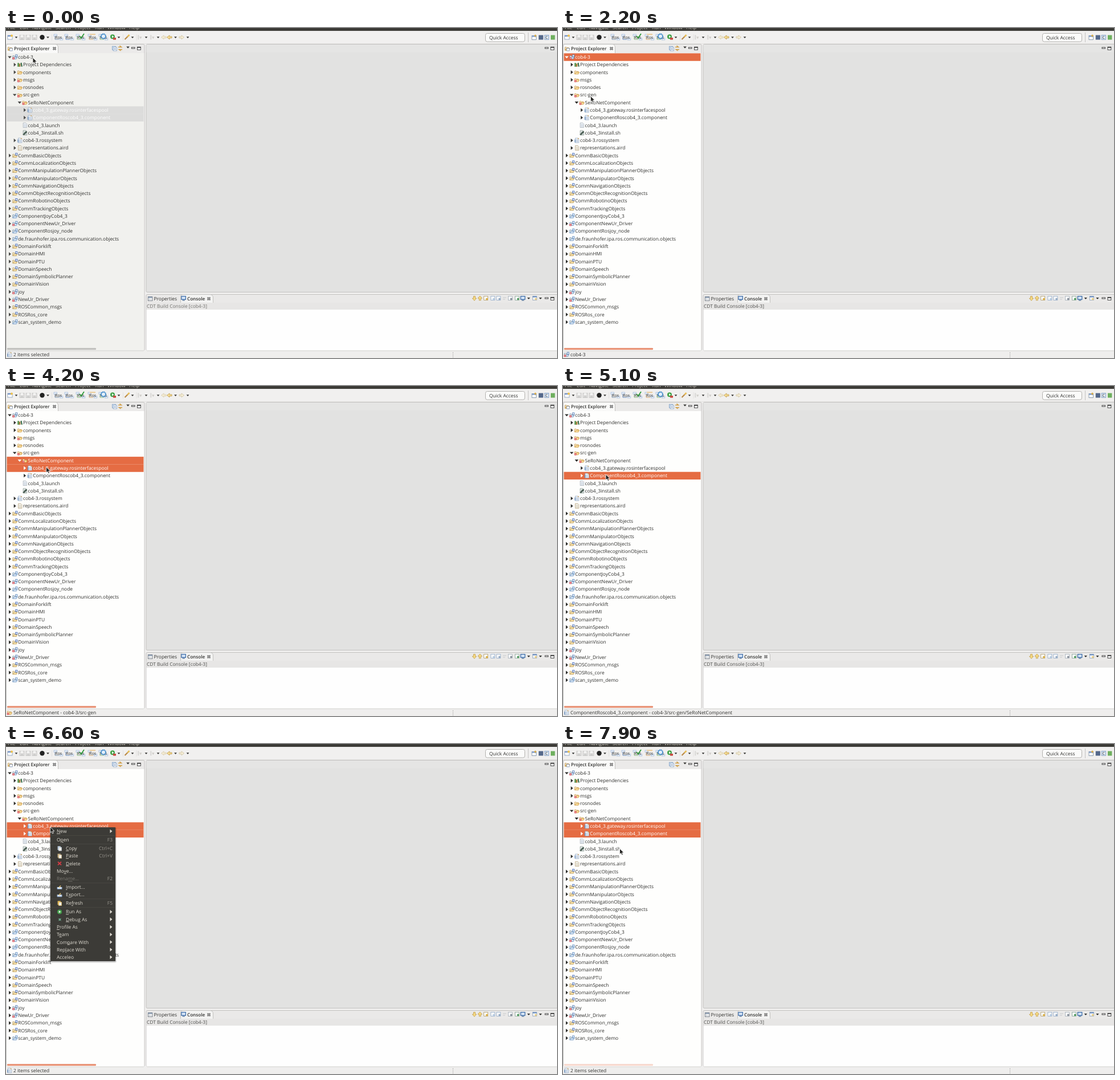
These frames come from a looping animation (967 px wide and 579 px high, 8000 ms). An HTML page:

```html
<!DOCTYPE html>
<html lang="en">
<head>
<meta charset="utf-8">
<title>Project Explorer</title>
<style>
html, body { margin: 0; width: 100%; height: 100%; overflow: hidden; background: #f0efee; }
svg { display: block; width: 967px; height: 579px; color: #30302e; }
text { font: 8.42px "Open Sans", "Noto Sans", sans-serif; fill: currentColor; text-rendering: geometricPrecision; white-space: pre; }
.bold { font-size: 8.15px; font-weight: 600; }
.row .bg { fill: none; }
.row.sel { color: #fff; }
.row.sel .bg { fill: #e56c43; }
.idle .row.sel .bg { fill: #dcdcdb; }
.idle .row .arrow { color: #4a4a48; }
#tree { fill: #fefefd; }
.idle #tree { fill: #f1f1ee; }
#label { color: #50504e; }
.idle #label { color: #72726f; }
#menu { color: #dfdbd2; }
.item .bg { fill: none; }
.item.hot { color: #fff; }
.item.hot .bg { fill: #e56c43; }
.item.hot .key { fill: #b9593a; }
.key { fill: #96938c; }
.off { color: #7b7973; }
.mn { text-decoration: underline; }
</style>
</head>
<body>
<svg id="stage" viewBox="0 0 967 579"></svg>
<script>
const LOOP = 8000, STEP = 100, ROW = 13.285, TOP = 44.4, BORDER = '#c3c2c0';

const rect = (x, y, w, h, fill, more = '') => `<rect x="${x}" y="${y}" width="${w}" height="${h}" fill="${fill}" ${more}/>`;
const path = (d, fill, more = '') => `<path d="${d}" fill="${fill}" ${more}/>`;
const line = (d, color, w = 1) => path(d, 'none', `stroke="${color}" stroke-width="${w}"`);
const dot = (x, y, r, fill) => `<circle cx="${x}" cy="${y}" r="${r}" fill="${fill}"/>`;
const text = (x, y, s, more = '') => `<text x="${x}" y="${y}" ${more}>${s}</text>`;
const at = (x, y, s) => `<g transform="translate(${x} ${y})">${s}</g>`;
const right = (x, y) => path(`M${x} ${y - 3.3}l4 3.3l-4 3.3z`, 'currentColor');
const down = (x, y, r = 2.6) => path(`M${x - r} ${y - r / 2}h${2 * r}l${-r} ${r * 1.15}z`, 'currentColor');
const minimize = (x, y) => rect(x - 2.5, y, 5.5, 2, '#fff', 'stroke="#333" stroke-width=".9"');
const maximize = (x, y) => rect(x - 2.8, y - 2.3, 5.8, 5, '#fff', 'stroke="#333" stroke-width=".9"') + rect(x - 2.8, y - 2.3, 5.8, 1.4, '#333');
const cross = (x, y) => line(`M${x - 2.3} ${y - 2.3}l4.6 4.6m0 -4.6l-4.6 4.6`, '#4a4a4a', 2.1) + line(`M${x - 1.9} ${y - 1.9}l3.8 3.8m0 -3.8l-3.8 3.8`, '#f4f4f4', .7);

// icons, centred on 0,0
const folder = (body, edge) => path('M-3.9 3.2V-2.2h2.4l.8 .9H2.6V.2', '#fdf6e0', `stroke="${edge}" stroke-width=".8"`)
  + path('M-3.9 3.2L-2 0H4.2L2.5 3.2z', body, `stroke="${edge}" stroke-width=".8"`);
const badge = rect(-4.5, .4, 3.6, 3.6, '#d8434a') + line('M-3.6 1.3l1.8 1.8m0 -1.8l-1.8 1.8', '#fff', .7);
const page = (edge, ink) => path('M-3 -4H1.6L3.4 -2.2V4H-3z', '#f6f8fb', `stroke="${edge}" stroke-width=".7"`)
  + line('M-1.7 -1.3H2M-1.7 .5H2M-1.7 2.3H2', ink, .7);
const project = (body, edge, tag) => folder(body, edge) + rect(.9, -4, 3.1, 3.4, '#fff', `stroke="${tag}" stroke-width="1"`);
const model = page('#8ba3bf', '#86a1c0') + rect(-4, -1.6, 1.6, 5.2, '#6c91bd') + rect(1.4, -4.2, 1.8, 1.8, '#d1aa6c');
const icons = {
  e: project('#cfdff1', '#6788ad', '#5c83b8') + badge,
  d: rect(-4.2, -3, 2.5, 6.6, '#4f8c42') + rect(-1.5, -1.8, 2.4, 5.4, '#ab7b3a') + path('M1 -3.2l2 -.4l1.4 7h-2.2z', '#3b6e4b'),
  f: folder('#fbe0a0', '#c8933c'),
  F: folder('#fbe0a0', '#c8933c') + badge,
  m: model,
  t: page('#9aa4af', '#a3b2c3'),
  s: page('#6d8076', '#70877b') + path('M-4 3L2 -3.4L4 -1.4L-1.4 4z', '#4a5d53'),
  a: page('#b09764', '#c4b183'),
  y: project('#fbe3ab', '#b3934f', '#4a70bd'),
  b: project('#dceaf8', '#5d87b8', '#6490c4'),
  r: project('#dceaf8', '#5d87b8', '#6490c4') + badge
};

// depth, state (v open, > closed, - leaf), icon, label
const rows = `0ve cob4-3
1>d Project Dependencies
1>f components
1>F msgs
1>f rosnodes
1vF src-gen
2vF SeRoNetComponent
3>m cob4_3.gateway.rosinterfacespool
3>m ComponentRoscob4_3.component
2-t cob4_3.launch
2-s cob4_3install.sh
1>m cob4-3.rossystem
1>a representations.aird
0>y CommBasicObjects
0>y CommLocalizationObjects
0>y CommManipulationPlannerObjects
0>y CommManipulatorObjects
0>y CommNavigationObjects
0>y CommObjectRecognitionObjects
0>y CommRobotinoObjects
0>y CommTrackingObjects
0>b ComponentJoyCob4_3
0>r ComponentNewUr_Driver
0>b ComponentRosjoy_node
0>b de.fraunhofer.ipa.ros.communication.objects
0>y DomainForklift
0>y DomainHMI
0>y DomainPTU
0>y DomainSpeech
0>y DomainSymbolicPlanner
0>y DomainVision
0>e joy
0>e NewUr_Driver
0>y ROSCommon_msgs
0>y ROSRos_core
0>b scan_system_demo`.split('\n');

function treeRow(s, i) {
  const dx = 8.7 * s[0], y = TOP + ROW * (i + .5), state = s[1];
  const arrow = state === 'v' ? down(6.5 + dx, y, 3.3) : state === '>' ? right(5 + dx, y) : '';
  return `<g class="row"><rect class="bg" x="1.5" y="${TOP + ROW * i}" width="240" height="${ROW + .1}"/>`
    + `<g class="arrow">${arrow}</g>` + at(15.8 + dx, y, icons[s[2]]) + text(21.2 + dx, y + 2.9, s.slice(4)) + '</g>';
}

// centre, label (_ marks the mnemonic), key or > for a submenu, icon colour
const items = [
  [153, '_New', '>'], [168, 'O_pen', 'F3'], [183, '_Copy', 'Ctrl+C', '#b9c7d8'], [196.4, '_Paste', 'Ctrl+V', '#c9b183'],
  [209.6, '_Delete', '', '#d23b45'], [223, 'Mo_ve...', ''], [236.4, 'Rena_me...', 'F2'], [251, '_Import...', '', '#7d9dc5'],
  [264.4, 'E_xport...', '', '#7d9dc5'], [279.2, 'Re_fresh', 'F5', '#e0b856'], [294.4, '_Run As', '>', '#44a04b'],
  [307.6, '_Debug As', '>', '#6fa58a'], [321, '_Profile As', '>'], [334.2, 'T_eam', '>'], [347.5, 'Com_pare With', '>'],
  [360.8, 'Rep_lace With', '>'], [374, 'Acceleo', '>']
];

function itemIcon(label, c) {
  if (label === '_Delete') return line('M-3 -2.8l6 5.6m0 -5.6l-6 5.6', c, 1.9);
  if (label === '_Run As') return dot(0, 0, 4, c) + path('M-1.2 -2.2l3.4 2.2l-3.4 2.2z', '#fff');
  if (label === '_Debug As') return dot(.4, .3, 2, c) + line('M-2 -2l5 5m0 -5l-5 5', c, .7);
  if (/port/.test(label)) return path('M-4 0V3.5H4V0', '#dce5ef', `stroke="${c}"`) + line('M-1 .8L2 -2.6', '#dfc173', 1.5);
  return rect(-3.4, -3.8, 5.2, 6.8, c) + rect(-1.4, -1.8, 5, 6, '#f1efe8', `stroke="${c}" stroke-width=".7"`);
}

function menuItem([y, label, key, icon]) {
  const name = label.replace(/_(.)/, '<tspan class="mn">$1</tspan>');
  return `<g class="item${key === 'F2' ? ' off' : ''}"><rect class="bg" x="79" y="${y - 6.6}" width="112" height="13.2"/>`
    + (icon ? at(94, y, itemIcon(label, icon)) : '')
    + text(icon ? 105 : 89, y + 3, name)
    + (key === '>' ? right(182.5, y) : text(187, y + 3, key, 'class="key" text-anchor="end"')) + '</g>';
}

const menuBar = () => rect(0, 0, 967, 5.2, '#3c3b37') + `<g color="#cfcbc2">`
  + [['File', 3], ['Edit', 24], ['Navigate', 46], ['Search', 87], ['Project', 121], ['Run', 156], ['Window', 178], ['Help', 216]]
    .map(([s, x]) => text(x, 2.3, s)).join('') + '</g>';

function toolbar() {
  const disk = x => at(x, 16.5, rect(-4, -4, 8, 8, '#e3e2e1', 'stroke="#c3c2c1" stroke-width=".8"') + rect(-2, -4, 4, 3, '#f7f7f6') + rect(-2.3, .8, 4.6, 3.2, '#cecdcc'));
  const ros = (x, c) => at(x, 16, rect(-8, -5, 5.4, 3.4, '#e6eef9', 'stroke="#8fadd4" stroke-width=".6"') + rect(2.4, 1.8, 5.4, 3.2, '#e6eef9', 'stroke="#8fadd4" stroke-width=".6"')
    + line('M-6 -1V4H1', c, .7) + text(-6, 3, 'Ros', 'style="font-size:7.2px" fill="#35506f"'));
  const arrow = (x, dir, fill, edge) => at(x, 16.3, path(`M${-4 * dir} -1.3H0V-3.4L${4.5 * dir} 0L0 3.4V1.3H${-4 * dir}z`, fill, `stroke="${edge}" stroke-width=".8"`));
  const faded = x => at(x, 16.3, rect(-3.8, -4, 2.2, 8, '#dad9d7') + path('M-1 -1l4.5 0l-2.2 4z', '#cfcdc8'));
  return rect(0, 5.2, 967, 23, '#f1f0ef') + line('M0 27.6H967', '#e2e1df')
    + at(7, 16.5, rect(-4, -3.5, 8, 7, '#fff', 'stroke="#8398b5" stroke-width=".8"') + rect(-4, -3.5, 8, 2, '#7594c5') + dot(3, -3, 2, '#efc14c'))
    + [28, 39, 50].map(disk).join('') + dot(63.5, 16.3, 4.2, '#222')
    + ros(92, '#58769b') + ros(111, '#3668b4')
    + ros(131, '#62a857') + line('M129 14l3 3.5l5 -7.5', '#2f9b3b', 1.8)
    + ros(152, '#c78b43') + rect(147, 10, 10, 2.4, '#ecd0a2')
    + ros(171, '#62a857') + `<circle cx="171" cy="14.5" r="4" fill="#e3effa" stroke="#2d7fc4" stroke-width="2" stroke-dasharray="2 .7"/>`
    + dot(187, 15.3, 4, '#40a248') + path('M186 13l3.4 2.3l-3.4 2.3z', '#fff') + rect(188, 17, 5, 3.6, '#c84942')
    + at(212.5, 16, line('M-4 4L1 -1', '#b98a46', 2.2) + line('M1 -1L4 -4', '#e8bd55', 2.6))
    + faded(235) + faded(257)
    + arrow(277, -1, '#f4ecd6', '#d6c9a8') + arrow(287, -1, '#f8df96', '#bd9642') + arrow(308, 1, '#f6efd8', '#cfc19b')
    + [18, 73.5, 198, 222, 246, 267, 297.5, 319].map(x => down(x, 16.4, 2.4)).join('')
    + [80.5, 205.5, 229].map(x => line(`M${x} 11V22`, '#dcdad8', .7)).join('')
    + rect(841.5, 9.5, 69, 14.5, '#fbfbfa', 'rx="3" stroke="#b3b2af"') + text(848, 19.6, 'Quick Access', 'fill="#5c5c5a"')
    + line('M916.5 8V25', '#c5c4c2')
    + at(927, 16.5, rect(-4, -3, 7.5, 7, '#fff', 'stroke="#73879f" stroke-width=".8"') + rect(-4, -3, 7.5, 2, '#7a9ac9') + path('M2 -5v4m-2 -2h4', 'none', 'stroke="#d6a63b" stroke-width="1.3"'))
    + rect(934.8, 12.5, 8, 8, '#54688a')
    + rect(945.2, 12.7, 7.5, 7.5, '#dfe9f4', 'stroke="#6b90be" stroke-width=".8"') + text(946.6, 19.2, 'C', 'style="font-size:7px" fill="#26538c"')
    + rect(956, 12.5, 7.4, 8, '#6fb05f');
}

const frame = (x, y, w, h, fill) => rect(x + .5, y + .5, w - 1, h - 1, fill, `stroke="${BORDER}" rx="2"`);

function explorer() {
  return frame(0, 28, 243.5, 538.5, '#ebeae9') + path('M.5 44V31Q.5 28.5 3 28.5H86Q91.5 28.5 91.5 34V44', '#f9f9f8', `stroke="${BORDER}"`)
    + '<rect id="tree" x="1" y="44" width="241.3" height="521.8"/>'
    + at(7.5, 36, folder('#fbdc93', '#b98a3a') + rect(-.8, -.4, 4.4, 4.4, '#fff', 'stroke="#667fa4" stroke-width=".7"'))
    + text(14, 39, 'Project Explorer', 'class="bold"') + cross(85, 36)
    + at(190, 35.7, rect(-3.5, -3.5, 6, 6, '#e9f1fa', 'stroke="#7b9cc3" stroke-width=".8"') + rect(-1.8, -1.8, 6, 6, '#fff', 'stroke="#7b9cc3" stroke-width=".8"') + line('M-.4 1.2H2.8', '#3a649b'))
    + at(200.5, 35.5, line('M-3.5 -2H2L-1 -4.4M3.5 2.2H-2L1 4.5', '#cf9f49', 1.5))
    + down(214, 34, 2.8) + minimize(223, 34) + maximize(233.3, 35.6)
    + rows.map(treeRow).join('') + '<rect id="bar" x="2" y="561.6" width="156" height="2.8" rx="1"/>';
}

function rightSide() {
  const arrow = (x, s) => path(`M${x - 1.5} ${474.2 - 3.6 * s}h3v${3.6 * s}h2.2L${x} ${474.2 + 4.2 * s}L${x - 3.7} ${474.2}h2.2z`, '#f8dc85', 'stroke="#b9923a" stroke-width=".7"');
  const sheet = (x, edge, mark) => at(x, 474.2, rect(-3.6, -3.5, 7, 6.8, '#f7f8f9', `stroke="${edge}" stroke-width=".7"`) + rect(0, -.4, 3.4, 3.4, mark));
  const screen = x => at(x, 474.3, rect(-3.6, -3.6, 7.4, 5.6, '#d5e5f7', 'stroke="#3767a4" stroke-width="1.2"') + rect(-2, 3, 4.3, 1.2, '#4b6d97'));
  return frame(245.5, 28, 723, 436, '#e2e2e1') + rect(246.5, 29, 722, 13.5, '#e5e5e4') + minimize(948.5, 34) + maximize(958.8, 35.6)
    + frame(245.5, 467, 723, 99.5, '#eae9e8') + rect(246.5, 482, 722, 12.2, '#e7e6e5') + rect(246.5, 494.2, 722, 71.5, '#fefefe')
    + path('M306.5 482V472Q306.5 467.5 311 467.5H357Q363.5 467.5 363.5 473V482', '#f3f3f2', `stroke="${BORDER}"`)
    + at(253, 475, rect(-3.6, -3.4, 7.4, 7, '#fff', 'stroke="#6d747d" stroke-width=".9"') + rect(-3.6, -3.4, 7.4, 1.8, '#7b8fa9') + line('M-.8 -2V3.6M-3.6 1H3.8', '#a5adb7', .7))
    + text(259.5, 478, 'Properties') + screen(311.5) + text(318, 478, 'Console', 'class="bold"') + cross(356, 475)
    + text(247, 491.2, 'CDT Build Console [cob4-3]', 'id="label"')
    + arrow(822, 1) + arrow(831.8, -1) + sheet(842.3, '#a78d52', '#dfb348') + sheet(854.5, '#829fc3', '#b9cce2') + sheet(864.5, '#829fc3', '#9aaec6')
    + line('M872 473H878M872 476H876', '#c7c9cc') + sheet(885, '#9ba5b1', '#8e969f') + sheet(897, '#7b9a8c', '#5aa267') + screen(907) + down(917.3, 474.2)
    + sheet(928, '#8096b1', '#eed38a') + rect(924, 470.5, 7.5, 2, '#6d90c1') + down(938, 474.2)
    + minimize(948.5, 473) + maximize(958.8, 474.7);
}

const contextMenu = () => `<g id="menu">` + rect(76, 146, 118, 238, '#000', 'rx="3" opacity=".1"') + rect(77, 146, 116, 236.5, '#000', 'rx="2" opacity=".16"')
  + rect(78, 146.3, 114, 234.7, '#3c3b37', 'rx="1"')
  + [160.6, 175.5, 243.8, 271.8, 286.8].map(y => line(`M79 ${y}H191`, '#4c4b46', .8)).join('')
  + items.map(menuItem).join('') + '</g>';

const statusBar = () => rect(0, 567, 967, 12, '#efeeed') + '<g id="icon" transform="translate(6.3 573)"></g>' + text(13, 575.9, '', 'id="status"')
  + path('M784.5 569V579', 'none', 'stroke="#8e8d8b" stroke-dasharray="1 1.6"');

const stage = document.getElementById('stage');
stage.innerHTML = rect(0, 0, 967, 579, '#f0efee') + menuBar() + toolbar() + explorer() + rightSide() + statusBar() + contextMenu()
  + path('M0 0V10L2.3 8L4 11.6L5.8 10.8L4.2 7.3H7.4Z', '#262624', 'id="cursor" stroke="#fff" stroke-width=".8" stroke-linejoin="round"');

const get = id => document.getElementById(id);
const rowEls = [...stage.querySelectorAll('.row')], itemEls = [...stage.querySelectorAll('.item')];

// step tables: [time, value...]
const picks = [[0, 7, 8], [700, 0], [2300, 5], [3100, 6], [4200, 6, 7], [5100, 8], [6200, 7, 8]];
const notes = [
  [0, 'm', '2 items selected'], [900, 'e', 'cob4-3'], [2300, 'F', 'src-gen - cob4-3'],
  [3200, 'F', 'SeRoNetComponent - cob4-3/src-gen'], [4300, 'm', '2 items selected'],
  [5100, 'm', 'ComponentRoscob4_3.component - cob4-3/src-gen/SeRoNetComponent'], [6300, 'm', '2 items selected']
];
const hots = [[0, -1], [6900, 0], [7100, 1], [7200, 2]];
const bars = [[0, '#bebdbb'], [700, '#e78a6b'], [7800, '#f0b5a0'], [7900, '#f7d6ca']];
const moves = [
  [0, 47, 52], [400, 47, 52], [500, 45, 52], [1500, 45, 52], [1600, 45, 56], [2200, 48.5, 119.5], [2500, 48.5, 119.5],
  [2700, 59.5, 130.5], [2800, 59.5, 130.5], [2900, 59.5, 131.5], [3400, 59.5, 131.5], [3600, 70.5, 142], [4700, 70.5, 142],
  [4900, 75, 155], [5500, 75, 155], [6000, 77.5, 145.5], [6800, 77.5, 145.5], [7100, 91, 168], [7200, 95, 174.5], [7400, 99.5, 183.5]
];

const current = (table, t) => table.filter(s => s[0] <= t).pop();

function pointer(t) {
  const a = current(moves, t), b = moves[moves.indexOf(a) + 1] || a;
  const k = b === a ? 0 : (t - a[0]) / (b[0] - a[0]);
  return [a[1] + (b[1] - a[1]) * k, a[2] + (b[2] - a[2]) * k];
}

function draw(t) {
  const sel = current(picks, t).slice(1), [, icon, note] = current(notes, t), hot = current(hots, t)[1];
  stage.classList.toggle('idle', t < 700);
  rowEls.forEach((el, i) => el.classList.toggle('sel', sel.includes(i)));
  itemEls.forEach((el, i) => el.classList.toggle('hot', i === hot));
  get('icon').innerHTML = icons[icon];
  get('status').textContent = note;
  get('bar').setAttribute('fill', current(bars, t)[1]);
  get('menu').setAttribute('visibility', t >= 6600 && t < 7700 ? 'visible' : 'hidden');
  get('cursor').setAttribute('transform', `translate(${pointer(t)})`);
}

const start = performance.now();
let shown = -1;
function tick() {
  const t = Math.floor((performance.now() - start) % LOOP / STEP) * STEP;
  if (t !== shown) draw(shown = t);
  requestAnimationFrame(tick);
}
tick();
</script>
</body>
</html>
```
